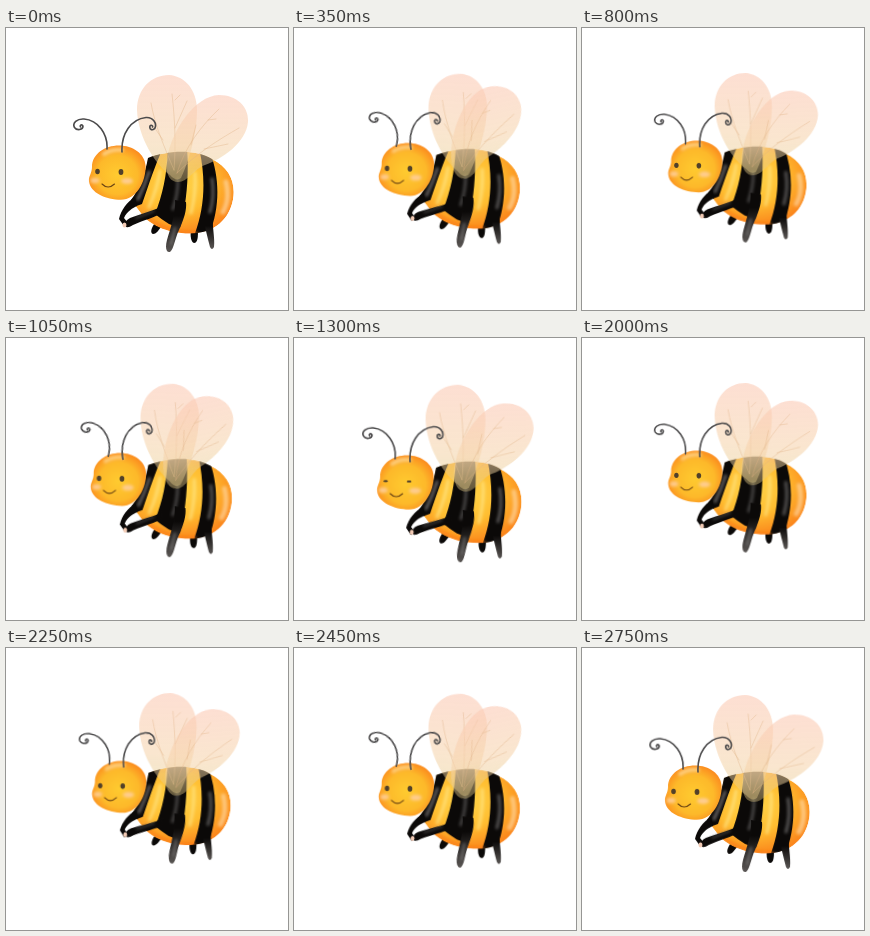
An HTML page without scripts that plays this animation: 282 by 282 pixels, repeating every 2.8 s.

```html
<!DOCTYPE html>
<html lang="en">
<head>
<meta charset="utf-8">
<title>Flying bee</title>
<style>
  html, body { margin: 0; width: 100%; height: 100%; overflow: hidden; background: #fff; }
  svg { display: block; width: 100%; height: 100%; }

  .bee, .swing { animation: var(--time) cubic-bezier(.37, 0, .63, 1) infinite alternate; }
  .bee { --time: 700ms; animation-name: drift; transform-origin: 156px 5px; }
  .swing { animation-name: swing; }
  .flap { --time: 350ms; }
  .kick { --time: 466.667ms; }

  .back-wing { --turn: 2.5deg; transform-origin: 170px 150px; }
  .front-wing { --turn: -12deg; transform-origin: 172px 150px; }
  .left-antenna { --turn: 12deg; transform-origin: 101px 121px; }
  .right-antenna { --turn: -7.5deg; transform-origin: 116px 124px; }
  .arm { --turn: 4deg; transform-origin: 154px 182px; }
  .far-arm { --turn: 3deg; transform-origin: 130px 170px; }
  .mid-leg { --turn: -4.5deg; transform-origin: 174px 176px; }

  .eye { transform-box: fill-box; transform-origin: center; animation: blink 2800ms infinite; }

  @keyframes drift { to { transform: scale(.953); } }
  @keyframes swing { to { transform: rotate(var(--turn)); } }
  @keyframes blink {
    0%, 42.8%, 55% { transform: none; }
    46.4%, 50% { transform: scaleY(.4); }
  }
</style>
</head>
<body>
<svg viewBox="0 0 282 282" fill="none" stroke-linecap="round" stroke-linejoin="round">
  <defs>
    <radialGradient id="fur" cx=".45" cy=".4" r=".62">
      <stop offset="0" stop-color="#ffd64c"/>
      <stop offset=".55" stop-color="#ffbd30"/>
      <stop offset="1" stop-color="#fb861c"/>
    </radialGradient>
    <radialGradient id="face" cx=".5" cy=".54" r=".6">
      <stop offset="0" stop-color="#ffcb30"/>
      <stop offset=".6" stop-color="#fdb92a"/>
      <stop offset="1" stop-color="#fb821c"/>
    </radialGradient>
    <linearGradient id="wing" x1="0" y1="0" x2="0" y2="1">
      <stop offset="0" stop-color="#fccbb7" stop-opacity=".62"/>
      <stop offset=".6" stop-color="#f6d4ac" stop-opacity=".58"/>
      <stop offset="1" stop-color="#e1c882" stop-opacity=".4"/>
    </linearGradient>
    <linearGradient id="limb" x1="0" y1="0" x2="0" y2="1">
      <stop offset=".3" stop-color="#0b0908"/>
      <stop offset="1" stop-color="#5a5654"/>
    </linearGradient>
    <filter id="soft" x="-60%" y="-60%" width="220%" height="220%"><feGaussianBlur stdDeviation="1.7"/></filter>
    <path id="torso" d="M142 130C162 122 190 121 206 131C222 139 229 152 227.500 168C225 191 208 205.500 184 205.500C160 205.500 142 196 134 184L125 172C134 160 139 146 142 130Z"/>
    <clipPath id="inside"><use href="#torso"/></clipPath>
  </defs>

  <g class="bee">
    <g fill="#0b0908">
      <path d="M149 195C145 200 144 205 147 206C151 206 153 201 156 198Z"/>
      <path d="M185 202C184 208 185 214 188 215C192 215 192 208 192 202Z"/>
    </g>

    <g clip-path="url(#inside)">
      <use href="#torso" fill="url(#fur)"/>
      <g fill="#0b0908">
        <path d="M130 120L157 120C150 135 144 153 136 176L120 182Z"/>
        <path d="M162 120L181 120C183 145 181 175 174 200L163 196Q155 191 149 186C157 166 161 146 162 120Z"/>
        <path d="M193 120L204 124C214 150 214 180 203 207L188 208C199 180 200 150 193 120Z"/>
      </g>
      <g filter="url(#soft)" stroke-width="3">
        <path d="M143 144C140 153 136 163 132 171" stroke="#8b8888" opacity=".7"/>
        <path d="M172 151C172 162 170 172 167 181" stroke="#868383" opacity=".5"/>
        <path d="M206 151C208 163 207 174 204 184" stroke="#8b8888" opacity=".6"/>
        <path d="M154 143C152 156 148 168 143 179M189 145C190 159 188 173 185 185" stroke="#fff0a0" opacity=".55"/>
        <path d="M220 154C223 166 221 177 217 184" stroke="#ffe0b0" stroke-width="5" opacity=".6"/>
        <path d="M139 188Q160 205 190 205" stroke="#fb7d14" opacity=".7"/>
      </g>
    </g>

    <path d="M197 188C199 200 202 211 204 219Q206 223 208 219C209 209 206 199 207 189Z" fill="url(#limb)"/>

    <g class="swing kick far-arm">
      <path d="M129 169C121 174 115 182 113 191L118 198L122 195L118 190C121 183 127 180 131 178Z" fill="#0b0908"/>
    </g>

    <path d="M113 117.600C127 117.600 139 126 139.600 138C140 154 130 171.800 115 171.800C100 171.500 84 165 83 153C82.500 148 86 145 86 139C86 126 99 117.600 113 117.600Z" fill="url(#face)"/>
    <g filter="url(#soft)">
      <path d="M98 126Q106 121 116 122" stroke="#ffe0a0" stroke-width="4" opacity=".7"/>
      <ellipse cx="89" cy="152.500" rx="4.500" ry="2.800" fill="#ffcb8c"/>
      <ellipse cx="121" cy="153" rx="6" ry="3" fill="#ffcd90"/>
    </g>
    <g fill="#51402a">
      <ellipse class="eye" cx="91.500" cy="143.500" rx="2.300" ry="2.800"/>
      <ellipse class="eye" cx="115" cy="144" rx="2.400" ry="2.900"/>
    </g>
    <path d="M96 156Q102 162 108.500 156" stroke="#6b4514" stroke-width="1.100"/>

    <g class="swing kick arm">
      <path d="M157 178C149 182 135 186 124 190Q118 193 119 198Q121 201 127 197C138 192 150 189 156 185Z" fill="#0b0908"/>
      <path d="M148 183L130 190" stroke="#777" stroke-width="1.500" opacity=".6" filter="url(#soft)"/>
      <ellipse cx="118.500" cy="197" rx="2" ry="2.600" fill="#f3cbb5"/>
    </g>

    <g class="swing kick mid-leg">
      <path d="M169 172C170 185 165 198 161 212C159 219 160 225 164 224C168 221 169 210 173 202C177 193 181 183 180 174Z" fill="url(#limb)"/>
      <path d="M169 200L165 216" stroke="#aaa" stroke-width="2" opacity=".5" filter="url(#soft)"/>
    </g>

    <g class="swing flap back-wing">
      <path d="M163 47C179 48 191 62 191 82C191 106 183 133 175 150Q170 154 164 147C150 137 132 110 131 82C131 61 145 47 163 47Z" fill="url(#wing)"/>
      <path d="M168 142C158 118 149 98 145 75M168 142C170 116 169 92 166 66M157 112L148 99M169 100L181 73M169 72L174 67" stroke="#dfb184" stroke-width=".8" opacity=".5"/>
    </g>
    <g class="swing flap front-wing">
      <path d="M213 67C231 67 243 79 242 94C240 115 216 131 199 137C188 141 182 154 172 154C162 154 158 142 162 126C167 103 188 68 213 67Z" fill="url(#wing)"/>
      <path d="M171 145C179 119 195 98 213 81M171 145C190 126 212 112 233 100M185 117L190 97M198 121L222 116M202 92L210 91" stroke="#dfb184" stroke-width=".8" opacity=".5"/>
    </g>

    <g stroke="#4b4a4b" stroke-width="1.600">
      <path class="swing flap left-antenna" d="M101 121C102 106 92 92 78 91C71 90.500 66 95 68.500 99.500C71 103 77 102 77 98C76 96 73.500 97 74.500 99"/>
      <path class="swing flap right-antenna" d="M116 124C115 106 125 91 140 89.500C147 89 151 95 149 100C147 103 143 102 144 98C145 96.500 147 97.500 146.500 99"/>
    </g>
  </g>
</svg>
</body>
</html>
```
